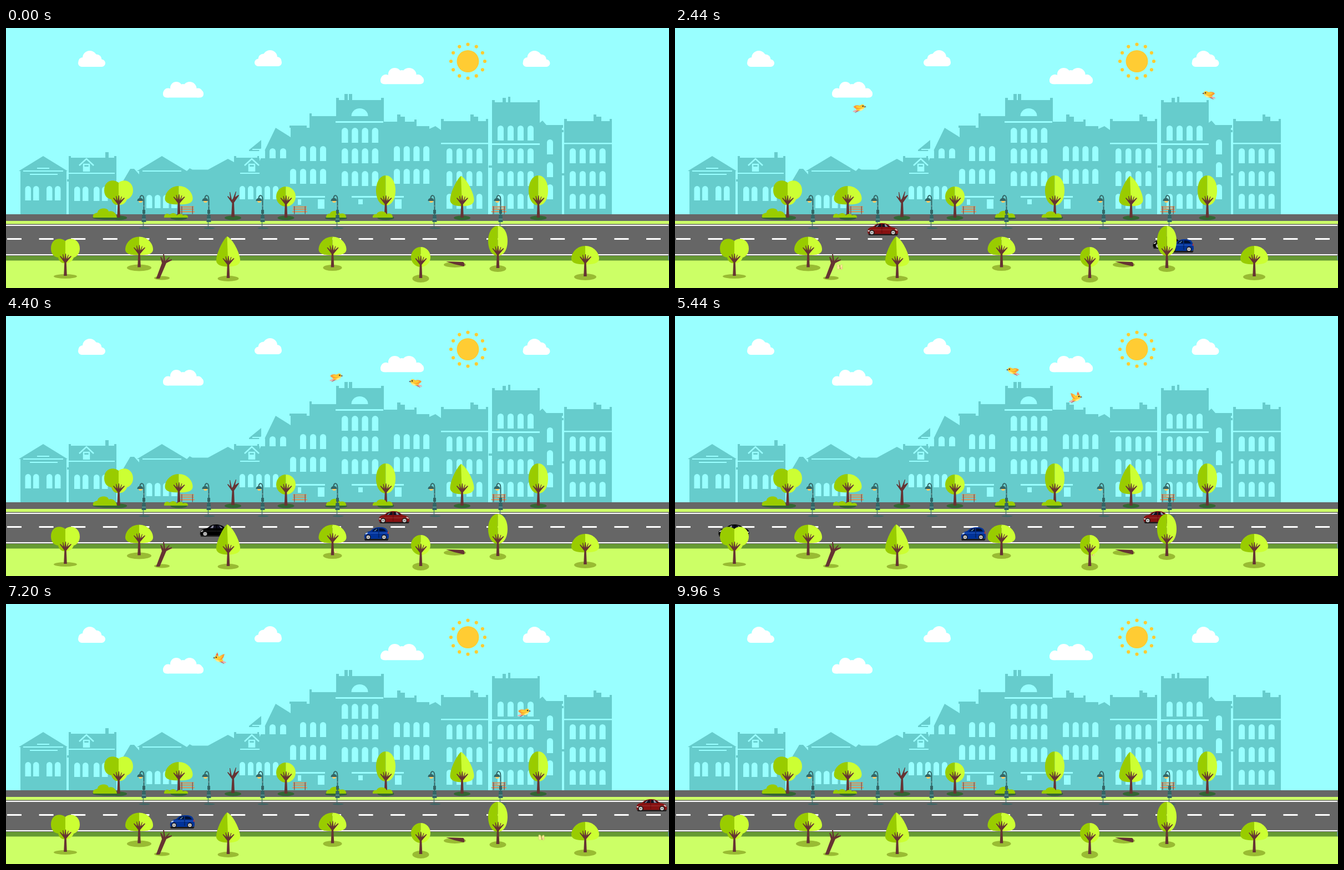
Animation of 1195 by 469 pixels, one loop 10 s. Source, as an HTML page:

```html
<!DOCTYPE html>
<html lang="en">
<head>
<meta charset="utf-8">
<title>City street</title>
<style>
html, body { margin: 0; width: 100%; height: 100%; overflow: hidden; background: #9ff; }
svg { display: block; width: 100%; height: 100%; }
.move { animation: 10s linear infinite; }
#red { animation-name: red; }
#black { animation-name: black; }
#blue { animation-name: blue; }
#birdA { animation-name: birdA; }
#birdB { animation-name: birdB; }
#fly { animation-name: fly; }
@keyframes red { from { transform: translate(-30px, 363px); } to { transform: translate(1628px, 363px); } }
@keyframes black { from { transform: translate(1526px, 387px); } to { transform: translate(-1084px, 387px); } }
@keyframes blue { from { transform: translate(1218px, 393px); } to { transform: translate(-32px, 393px); } }
@keyframes birdA {
  0% { transform: translate(-18px, 228px); }
  15.2% { transform: translate(202px, 185px); }
  20.8% { transform: translate(282px, 160px); }
  31.2% { transform: translate(428px, 111px); }
  33.6% { transform: translate(462px, 96px); }
  37.2% { transform: translate(512px, 80px); }
  41.6% { transform: translate(566px, 100px); }
  54.4% { transform: translate(722px, 147px); }
  64% { transform: translate(839px, 182px); }
  72% { transform: translate(934px, 194px); }
  81.2% { transform: translate(1036px, 190px); }
  93.6% { transform: translate(1165px, 165px); }
  100% { transform: translate(1222px, 140px); }
}
@keyframes birdB {
  0% { transform: translate(1209px, 73px); }
  10.4% { transform: translate(1104px, 94px); }
  15.2% { transform: translate(1056px, 103px); }
  20.8% { transform: translate(1000px, 113px); }
  31.2% { transform: translate(891px, 130px); }
  33.6% { transform: translate(863px, 132px); }
  41.6% { transform: translate(768px, 124px); }
  54.4% { transform: translate(609px, 98px); }
  64% { transform: translate(491px, 80px); }
  67% { transform: translate(454px, 79px); }
  72.8% { transform: translate(374px, 101px); }
  81.2% { transform: translate(246px, 119px); }
  86% { transform: translate(178px, 121px); }
  93.6% { transform: translate(70px, 113px); }
  99.6%, 100% { transform: translate(-16px, 88px); }
}
@keyframes fly {
  0% { transform: translate(-9px, 449px); }
  10.4% { transform: translate(121px, 439px); }
  15.2% { transform: translate(178px, 434px); }
  20.8% { transform: translate(247px, 432px); }
  31.2% { transform: translate(392px, 429px); }
  33.6% { transform: translate(431px, 429px); }
  54.4% { transform: translate(752px, 428px); }
  64% { transform: translate(877px, 427px); }
  81.2% { transform: translate(1067px, 415px); }
  93%, 100% { transform: translate(1206px, 407px); }
}
/* wing poses: A beats 25 times a loop, B 26 times */
.up, .down { animation: 400ms step-end infinite; }
#birdA .up { animation-name: upA; }
#birdA .down { animation-name: downA; }
#birdB .up, #birdB .down { animation-duration: 384.6154ms; }
#birdB .up { animation-name: upB; }
#birdB .down { animation-name: downB; }
@keyframes upA { 0%, 85% { opacity: 0; } 35% { opacity: 1; } 100% { opacity: 0; } }
@keyframes downA { 0%, 85% { opacity: 1; } 35% { opacity: 0; } 100% { opacity: 1; } }
@keyframes upB { 0%, 85% { opacity: 0; } 45% { opacity: 1; } 100% { opacity: 0; } }
@keyframes downB { 0%, 85% { opacity: 1; } 45% { opacity: 0; } 100% { opacity: 1; } }
.flutter { animation: flutter 400ms ease-in-out infinite; }
@keyframes flutter { 50% { transform: scaleX(.7) rotate(12deg); } }
</style>
</head>
<body>
<svg viewBox="0 0 1195 469" preserveAspectRatio="none" xmlns="http://www.w3.org/2000/svg">
<defs>
  <path id="trunk" fill="#633" d="M-2.8 0L-1.7-24-10-35-9-36-4-31-5-39-4-39-1.5-30 0-40 1-40 1.8-30 5-38 6-38 4-31 10-36 11-35 1.8-24 2.8 0z"/>
  <g id="heart">
    <path fill="#9c0" d="M0-63C-9-70-26-68-26-49-26-39-20-34-13-33-11-24-4-22 0-23z"/>
    <path fill="#cf3" d="M0-63C9-71 26-66 26-49 26-40 20-34 15-33 12-24 4-22 0-23z"/>
    <use href="#trunk"/>
  </g>
  <g id="dome">
    <path fill="#9c0" d="M0-55C-15-55-25-43-25-32-25-24-15-21 0-22z"/>
    <path fill="#cf3" d="M0-55C15-55 25-43 25-32 25-24 15-21 0-22z"/>
    <use href="#trunk"/>
  </g>
  <g id="round">
    <path fill="#9c0" d="M0-56A17.5 18 0 0 0 0-20z"/>
    <path fill="#cf3" d="M0-56A17.5 18 0 0 1 0-20z"/>
    <use href="#trunk"/>
  </g>
  <g id="oval">
    <path fill="#9c0" d="M0-76C-11-76-17.5-63-17.5-49-17.5-34-11-22 0-22z"/>
    <path fill="#cf3" d="M0-76C11-76 17.5-63 17.5-49 17.5-34 11-22 0-22z"/>
    <use href="#trunk"/>
  </g>
  <g id="drop">
    <path fill="#9c0" d="M-2-75C-9-70-22-44-21.5-31-21-23-10-20 0-21L0-74z"/>
    <path fill="#cf3" d="M-2-75C8-71 22-44 21.5-31 21-23 10-20 0-21z"/>
    <use href="#trunk"/>
  </g>
  <path id="bare" fill="#633" d="M-3 0L-1.5-25-10-37-9-38-5-34-6-45-5-45-2-31 0-33 5-46 6-46 4-36 10-40 11-39 2-26 3 0z"/>
  <g id="lamp">
    <ellipse cx="1" cy="13" rx="10" ry="1.4" fill="#366" opacity=".8"/>
    <path d="M-1 2v10" stroke="#366" stroke-width="2" opacity=".6"/>
    <path d="M0 0V-38C0-49-7-47-7-41" fill="none" stroke="#366" stroke-width="2"/>
    <path fill="#fc6" d="M-10-36h8l-2 3h-4z"/>
    <path fill="#366" d="M-12-36C-12-43-1-43-1-36zM-2.5-20h5v7h-5zM-3-11h6L4 2h-8z"/>
    <path fill="#699" d="M-1.5-28h3v2h-3zM-3.5-4h7v1.5h-7z"/>
  </g>
  <g id="bench">
    <path fill="#c96" d="M0 0h25v2.4H0zM0 4h25v2.4H0zM-1 8.5h27v2.4H-1z"/>
    <path fill="#855" d="M2 0h1.5v14H2zM21.5 0H23v14h-1.5z"/>
  </g>
  <g id="cloud" fill="#fff">
    <rect y="16" width="49" height="13" rx="6.5"/>
    <circle cx="8.5" cy="20" r="8"/><circle cx="21" cy="13" r="13"/><circle cx="33" cy="16" r="9.5"/><circle cx="42" cy="22" r="6.5"/>
  </g>
  <g id="wide" fill="#fff">
    <rect y="15" width="73" height="13.5" rx="6"/>
    <circle cx="9" cy="20" r="8.5"/><circle cx="24" cy="11" r="11"/><circle cx="36" cy="14" r="10"/><circle cx="48" cy="12.5" r="12.5"/><circle cx="63" cy="20" r="8.5"/>
  </g>
  <g id="wheel">
    <circle r="4.7" fill="#111"/><circle r="3.3" fill="#ccc"/><circle r="1.2" fill="#777"/>
  </g>
  <g id="sedan">
    <path fill="#111" opacity=".85" d="M-27 8H27L26 11H-25z"/>
    <path fill="currentColor" d="M-27 1C-26-3-21-4-18-4-13-9-9-11-1-11 8-11 10-8 15-4 22-3 26-1 27 2L27.5 7 25 8.500H-26C-28 7-28 4-27 1z"/>
    <path fill="#112" d="M-15-4C-12-8-9-9.500-3-9.500V-4zM-1.500-9.500C6-9.500 8-8 12.500-4H-1.500z"/>
    <path fill="#99a" d="M-13-4.500L-8-8.500-7-8.500-10-4.500zM4-4.500L3-9 5-9 9-4.500z"/>
    <path d="M-25 1H24" stroke="#fff" stroke-width=".7" opacity=".25"/>
    <path d="M-2-4V7" stroke="#000" stroke-width=".6" opacity=".5"/>
    <path fill="#ddd" d="M22-1l4 2v2l-4-2zM-27 2h3v2h-3z"/>
    <use href="#wheel" x="-20" y="6"/><use href="#wheel" x="18.500" y="6"/>
  </g>
  <g id="hatch">
    <path fill="#111" opacity=".85" d="M-22 8.500H22L20 12H-21z"/>
    <path fill="#039" d="M-22 7C-23 0-18-4-11-5-6-11-1-12 7-12 15-12 18-10 20-5 22-2 22 3 22 7L19 9H-20z"/>
    <path fill="#013" d="M-8-4.500C-5-9-2-10 3-10V-4.500zM4.500-10C12-10 15-9 17-4.500H4.500z"/>
    <path fill="#58b" d="M-5-5L0-9H1.500L-2-5z"/>
    <path d="M-18-1.500H20" stroke="#36c" stroke-width="1"/>
    <path d="M4-4V7" stroke="#012" stroke-width=".7"/>
    <path fill="#cde" d="M-20-1l4-1.500v2l-4 2z"/>
    <path fill="#c33" d="M20-4h1.500v4H20z"/>
    <use href="#wheel" x="-15" y="6"/><use href="#wheel" x="13.500" y="6"/>
  </g>
  <g id="bird">
    <path fill="#f99" d="M-4 4L-12 7-11 8.500-3 6z"/>
    <path fill="#c66" d="M-3 5L-9 9.500-8 10 0 6z"/>
    <path fill="#fc3" d="M-7 4C-3-1 0-4 4-5 9-6 10-1 8 2 5 7-2 8-7 4z"/>
    <path fill="#fe9" d="M-1 5C3 3 5 2 8 1 5 7 2 7-1 5z"/>
    <circle cx="6" cy="-2" r="1.300" fill="#333"/>
    <path fill="#644" d="M9-2.500L12-.800 8.500.500z"/>
  </g>
  <g id="wingUp">
    <path fill="#f93" d="M-2 3C-8 0-8-5-9-8-4-7 1-4 2 1z"/>
    <path fill="#fc3" d="M-1 2C-4-1-5-4-6-6-2-5 2-2 2 1z"/>
    <path fill="#f63" d="M2-5L4-11 7-5z"/>
  </g>
  <g id="wingDown">
    <path fill="#f93" d="M3-2C-3-5-9-4-11-1-8 4-1 5 3 1z"/>
    <path fill="#fc3" d="M3-2C-2-4-6-3-7-1-4 2 0 3 3 1z"/>
  </g>
</defs>

<rect width="1195" height="469" fill="#9ff"/>
<use href="#cloud" x="130" y="41"/>
<use href="#cloud" transform="translate(497 40) scale(-1 1)"/>
<use href="#cloud" x="931.500" y="41"/>
<use href="#wide" x="283" y="97"/>
<use href="#wide" transform="translate(675 72) scale(1.070 1.030)"/>
<circle cx="832.500" cy="60" r="20" fill="#fc3"/>
<g id="rays" fill="#fc3"></g>

<g fill="#6cc">
  <path d="M23 258L67 231 111 258H109V336H26V258z"/>
  <path d="M113 231h4v3h62v-10h6v10h10v-3h4V336H113z"/>
  <path d="M204 336V288L224 254H231L240 264V258H236L281 231 326 258 331 253 336 255.500H364L400 236 411 242V231h4v3h38v-3h4v9L486 180 513 197V180H511V176H542V180H547V154h4v5h44V126h5v4h10V119h6v11h2V119h6v11h52V126h5v43h24V156h6v4h8v9h17V165h4v12h23v5L774 177 784 184V164h5v4h48V156h6v4h8v8h14V164h4V336z"/>
  <path d="M438 220L460 202V222H438z"/>
  <path d="M876 130h5v4h14V126h6v8h4V124h4v10h49V130h4v41L967 167 974 175H1004V180H1002V336H876z"/>
  <path d="M1006 164h5v4h48V156h5v4h9v8h15V164h4V336H1006z"/>
  <path d="M110 273h3v4h-3zM870 248h6v4h-6zM1002 184h3v4h-3zM1002 262h4v4h-4z"/>
</g>
<g id="cutouts" fill="#9ff">
  <path d="M56 252h22v2H56zM31 257h72v2H31zM43 263h50v2H43zM113 261h83v2h-83zM246 257h70v2h-70zM422 261h35v2h-35zM594 168h86v3h-86zM784 207h85v2.500h-85zM872 208h90v3h-90zM1006 207h86v2.500h-86z"/>
  <path d="M444 218h15v2h-15zM522 303h53v3h-53zM623 303h94v3h-94zM526 309h6v10h-6zM562 309h12v17h-12zM635 309h8v9h-8zM701 309h12v17h-12z"/>
  <path d="M622.500 159A15 14 0 0 1 652.500 159z"/>
</g>
<g fill="none" stroke="#9ff" stroke-width="2.500">
  <path d="M132 248L145 236 158 248M139 246H151M140 246V259M150 246V259M430 248L443 236 456 248M437 246H449M438 246V259M448 246V259"/>
</g>
<path fill="#9ff" d="M141 250h8v9h-8zM439 250h8v9h-8z"/>

<rect y="336" width="1195" height="12" fill="#666"/>
<rect y="348" width="1195" height="6" fill="#cf6"/>
<rect y="353.500" width="1195" height="58" fill="#666"/>
<rect y="411" width="1195" height="9" fill="#693"/>
<rect y="419.500" width="1195" height="50" fill="#cf6"/>
<rect x="1193.500" y="411" width="1.500" height="8" fill="#699"/>
<path d="M0 356H1194M0 409H1194" stroke="#fff" stroke-width="2"/>
<path d="M2 380.500H1195" stroke="#fff" stroke-width="3" stroke-dasharray="26 31.600"/>

<use href="#bench" x="314" y="321.500"/><use href="#bench" x="517" y="321.500"/><use href="#bench" x="876" y="321.500"/>
<g id="back"></g>
<g id="bushes" fill="#9c0">
  <path d="M157 342C155 334 163 334 165 333 165 324 184 323 185 331 191 328 199 333 200 342z"/>
  <path d="M285 342C284 335 292 333 295 337 299 332 306 334 308 338 312 334 318 335 319 338 325 335 329 339 328 342z"/>
  <path d="M577 342C576 335 583 335 584 335 585 328 601 328 602 335 609 333 614 337 613 342z"/>
  <path d="M661 342C660 336 666 335 668 336 670 329 684 329 686 336 692 332 698 337 697 342z"/>
</g>
<g id="lamps"></g>

<g class="move" id="red" color="#811"><use href="#sedan"/></g>
<g class="move" id="black" color="#000"><use href="#sedan" transform="scale(-1 1)"/></g>
<g class="move" id="blue"><use href="#hatch"/></g>
<g class="move" id="fly"><g class="flutter">
  <path fill="#fe9" stroke="#cc6" stroke-width=".8" d="M0 0C-2-7-7-6-5-1-7 3-3 7 0 2 3 7 6 4 4 0 6-5 2-7 0 0z"/>
  <path d="M-1-3L1 4" stroke="#993" stroke-width="1.200"/><circle cx="3" cy="2" r="1.300" fill="#fb9"/>
</g></g>
<g id="front"></g>
<path fill="#633" d="M270.500 452L281 424 278 413 280 413 284 420 283 408 285 408 287 420 294 413 295 414 291 419 299 417 299 419 289 424 277 452z"/>
<path fill="#633" d="M793 421L824 422C827 424 827 429 825 430L808 426z"/>

<g class="move" id="birdA">
  <use href="#bird"/><use class="up" href="#wingUp"/><use class="down" href="#wingDown"/>
</g>
<g class="move" id="birdB"><g transform="scale(-1 1)">
  <use href="#bird"/><use class="up" href="#wingUp"/><use class="down" href="#wingDown"/>
</g></g>
</svg>
<script>
const el = id => document.getElementById(id);
const add = (id, markup) => el(id).insertAdjacentHTML('beforeend', markup);

for (let i = 0; i < 12; i++) {
  const a = i * Math.PI / 6;
  add('rays', `<circle cx="${832.5 + 30.5 * Math.cos(a)}" cy="${60 + 30.5 * Math.sin(a)}" r="3.1"/>`);
}

// rows of arched windows: first x, step, count, width, height, tops
function windows(x, step, n, w, h, ...tops) {
  const r = w / 2;
  let d = '';
  for (const y of tops)
    for (let i = 0; i < n; i++)
      d += `M${x + i * step} ${y + h}v${r - h}a${r} ${r} 0 0 1 ${w} 0v${h - r}z`;
  add('cutouts', `<path d="${d}"/>`);
}
windows(34.5, 14.5, 2, 10.5, 26, 285);
windows(73, 15, 2, 10.5, 26, 285);
windows(123, 15, 2, 10.5, 26, 286);
windows(158, 15, 2, 10.5, 26, 286);
windows(253, 15, 4, 10.5, 24, 301);
windows(421, 15, 5, 10, 24, 285);
windows(456, 19, 3, 11, 18, 217);
windows(530, 18, 3, 11, 27, 213);
windows(512, 18, 4, 11, 27, 254);
windows(605, 18.2, 4, 11.5, 27, 180, 217, 258);
windows(699, 17.7, 4, 11, 27, 213, 254);
windows(794, 18, 4, 10.5, 27, 217, 258, 299);
windows(886, 18, 4, 11, 27, 176, 217, 258, 299);
windows(975, 0, 1, 11, 27, 201, 242, 282);
windows(1016, 17.9, 4, 11, 27, 217, 258, 299);

const shadow = (layer, x, y, rx, ry, fill) =>
  add(layer, `<ellipse cx="${x}" cy="${y}" rx="${rx}" ry="${ry}" fill="${fill}"/>`);
const place = (layer, kind, x, y) => add(layer, `<use href="#${kind}" x="${x}" y="${y}"/>`);

shadow('back', 187, 342, 31, 4, '#363');
shadow('back', 595, 343, 20, 3, '#363');
[['heart', 203, 342], ['dome', 311.5, 340], ['bare', 409, 341], ['round', 504.5, 342],
 ['oval', 684.5, 342], ['drop', 822, 342], ['oval', 959.5, 342]].forEach(([kind, x, y]) => {
  shadow('back', x, 342.5, 15, 4, '#363');
  place('back', kind, x, y);
});

for (const x of [248.5, 365.5, 462.5, 597.5, 772.5, 891.5]) place('lamps', 'lamp', x, 348);

const olive = '#9b3';
[['heart', 107, 447, 21, 4], ['dome', 240, 431.5, 22, 6], ['drop', 400.5, 451, 19, 5],
 ['dome', 588.5, 431.5, 17, 5.5], ['round', 747.5, 451, 15, 7], ['oval', 886.5, 433, 15, 6],
 ['dome', 1044, 448, 20, 6]].forEach(([kind, x, y, rx, ry]) => {
  shadow('front', x, y + 1, rx, ry, olive);
  place('front', kind, x, y);
});
shadow('front', 281, 451, 14, 3.5, olive);
shadow('front', 809, 427, 20, 5, olive);
</script>
</body>
</html>
```
